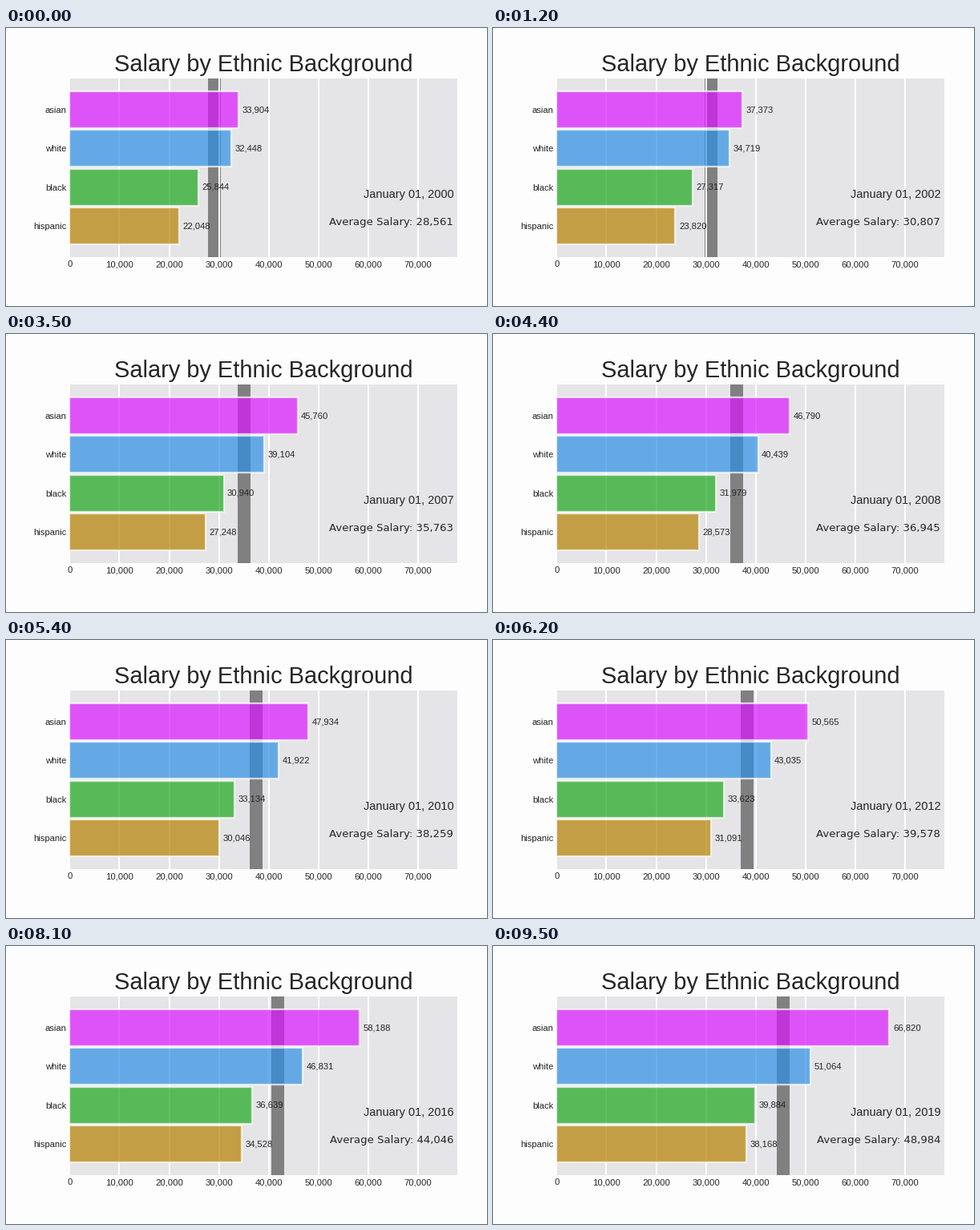
Recreate the animation shown at these times as a matplotlib script. Size 600 by 347 pixels, loop 9.6 s.

```python
import matplotlib.pyplot as plt
import numpy as np
from matplotlib.animation import FuncAnimation

W, H, DPI = 600, 347, 100
STEPS = 5          # frames per year
START_YEAR, LAST_YEAR = 2000, 2019
PX = 72 / DPI      # one pixel in points
PT = 1.61 * PX     # scale for font sizes
INK = "0.15"

plt.rcParams.update({
    "font.family": "Liberation Sans",
    "text.color": INK,
})

# Key salaries from the bottom bar to the top one, joined by straight lines
KEY_YEARS = [0, 5, 7, 10.8, 14, 16.2, 19]
GROUPS = {
    "hispanic": ("#B68100", [22048, 25740, 27248, 30046, 32136, 34528, 38168]),
    "black": ("#1CA71C", [25844, 28912, 30940, 33134, 34112, 36639, 39884]),
    "white": ("#2E91E5", [32448, 37180, 39104, 41922, 44148, 46831, 51064]),
    "asian": ("#DA16FF", [33904, 41132, 45760, 47934, 53196, 58188, 66820]),
}
colors, keys = zip(*GROUPS.values())

frame_count = STEPS * (LAST_YEAR - START_YEAR) + 1
top_salary = np.max(keys)
x_max = top_salary * 1.05 * 1.11
rows = np.arange(1, len(GROUPS) + 1)

fig = plt.figure(figsize=(W / DPI, H / DPI), dpi=DPI, facecolor="#fefdfe")
left, top, right, bottom = 79.4, 63.3, 563, 286
ax = fig.add_axes([left / W, 1 - bottom / H, (right - left) / W, (bottom - top) / H],
                  facecolor="#e5e4e6")
ax.set_axisbelow(True)
ax.grid(True, axis="x", color="white", lw=2 * PX, ls="-")
ax.spines[:].set_visible(False)
ax.tick_params(length=0, pad=2.5 * PT, labelsize=7 * PT, labelcolor=INK)
ticks = np.arange(0, x_max, 10000)
ax.set_xticks(ticks, [f"{t:,.0f}" for t in ticks])
ax.set_yticks(rows, list(GROUPS))
ax.set_title("Salary by Ethnic Background", size=18 * PT, pad=6 * PT)

median_line = ax.axvline(0, lw=16 * PX, color="0.5", zorder=0.4)
bars = ax.barh(rows, 0, height=0.95, color=colors,
               edgecolor="white", lw=2.3 * PX, alpha=0.7)
ax.set_xlim(0, x_max)
ax.set_ylim(0.2, len(rows) + 0.8)
values = [ax.text(0, y, "", size=7 * PT, va="center") for y in rows]
date = ax.text(0.99, 0.35, "", size=9 * PT, ha="right", va="center",
               transform=ax.transAxes)
average = ax.text(0.99, 0.18, "", size=8.2 * PT, ha="right", va="baseline",
                  family="DejaVu Sans", transform=ax.transAxes)


def update(frame):
    now = [np.interp(frame / STEPS, KEY_YEARS, key) for key in keys]
    for bar, label, value in zip(bars, values, now):
        bar.set_width(value)
        label.set_x(value + 0.011 * top_salary)
        label.set_text(f"{value:,.0f}")
    mid = np.median(now)
    median_line.set_xdata([mid, mid])
    date.set_text(f"January 01, {START_YEAR + frame // STEPS}")
    average.set_text(f"Average Salary: {np.mean(now):,.0f}")
    return [median_line, *bars, *values, date, average]


anim = FuncAnimation(fig, update, frames=frame_count, interval=100,
                     repeat=True, repeat_delay=0)
plt.show()
```
